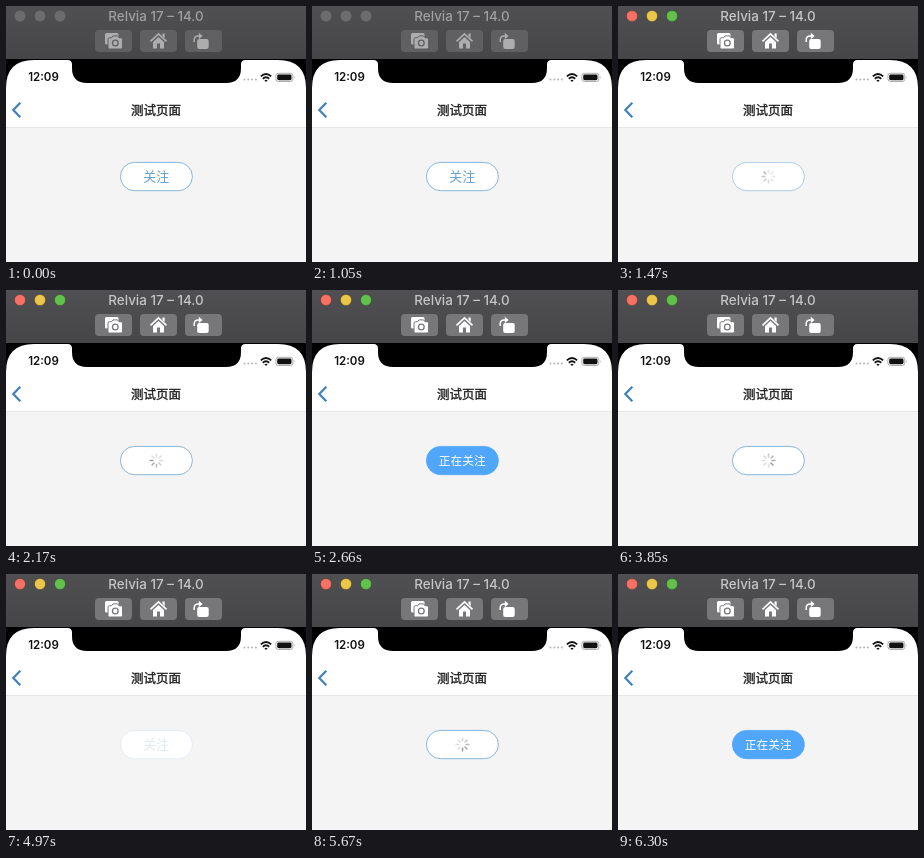
Recreate the animation shown at these times as an HTML page. Size 300 px wide and 256 px high, loop 6.37 s.

```html
<!DOCTYPE html>
<html lang="zh-CN">
<head>
<meta charset="utf-8">
<title>Follow button</title>
<style>
  html, body { margin: 0; width: 100%; height: 100%; overflow: hidden; background: #f4f4f5; }
  svg { display: block; width: 300px; height: 256px; }
  text { text-anchor: middle; font-family: "Noto Sans CJK SC", "Noto Sans CJK", "Noto Sans", sans-serif; }
  .latin { font-family: Inter, "Liberation Sans", sans-serif; }
  .tool { fill: #605f61; }
  .rim { stroke: #605f61; }
  .icon { color: #adadad; }
  .name { fill: #a09fa1; }
  .light { fill: #6c6b6d; }
  .active .tool { fill: #777678; }
  .active .rim { stroke: #777678; }
  .active .icon { color: #fff; }
  .active .name { fill: #c6c5c7; }
  .active .light { fill: var(--on); stroke: #0003; }
</style>
</head>
<body>
<svg viewBox="0 0 300 256">
  <defs>
    <linearGradient id="bar" x2="0" y2="1">
      <stop stop-color="#504f51"/><stop offset="1" stop-color="#464547"/>
    </linearGradient>
  </defs>

  <!-- Simulator window bar -->
  <g id="window">
    <rect width="300" height="53" fill="url(#bar)"/>
    <circle class="light" cx="14" cy="10" r="5.5" style="--on:#f77064"/>
    <circle class="light" cx="34" cy="10" r="5.5" style="--on:#ecc648"/>
    <circle class="light" cx="54" cy="10" r="5.5" style="--on:#62c04c"/>
    <text class="latin name" x="150" y="15.2" font-size="13.4" font-weight="500">Relvia 17 – 14.0</text>
    <g class="tool">
      <rect x="89" y="24" width="37" height="22" rx="4"/>
      <rect x="134" y="24" width="37" height="22" rx="4"/>
      <rect x="179" y="24" width="37" height="22" rx="4"/>
    </g>
    <g class="icon" fill="currentColor">
      <rect x="99" y="27" width="13.5" height="11.5" rx="1.5"/>
      <path class="rim" d="M103.500 31.700h2.200l1.300-1.800h4.600l1.300 1.800h2.100q1.500 0 1.500 1.500v8.300q0 1.500-1.500 1.500h-11.500q-1.500 0-1.500-1.500v-8.300q0-1.500 1.500-1.500z"/>
      <circle class="tool" cx="109.300" cy="37" r="3.500"/>
      <circle cx="109.300" cy="37" r="2.200"/>
      <path d="M144.500 35.300l8-7.400 8 7.400" fill="none" stroke="currentColor" stroke-width="1.700"/>
      <path d="M156.500 27.500h2.200v4.500l-2.200-2z"/>
      <path d="M147 35.900l5.500-5 5.500 5v6.600h-4v-5h-3v5h-4z"/>
      <rect x="191.200" y="33" width="11.500" height="10" rx="2"/>
      <path d="M188.200 36v-2q0-4 4-4h1.300" fill="none" stroke="currentColor" stroke-width="1.500"/>
      <path d="M192.800 26.800l3.800 3.200-3.800 3.200z"/>
    </g>
  </g>

  <!-- Phone screen -->
  <rect y="53" width="300" height="40" fill="#000"/>
  <path d="M0 121V82Q0 54 28 54H61.500Q66 54 66 58.500V62Q66 77 81 77H220Q235 77 235 62V58.500Q235 54 239.500 54H272Q300 54 300 82V121Z" fill="#fff"/>
  <rect y="121" width="300" height="135" fill="#f4f4f5"/>
  <rect y="121" width="300" height=".8" fill="#e4e4e5"/>

  <text class="latin" x="37.500" y="75.200" font-size="11.500" font-weight="600" fill="#111">12:09</text>
  <g fill="#b5b5b5">
    <circle cx="238.500" cy="73.500" r="1"/><circle cx="242.300" cy="73.500" r="1"/>
    <circle cx="246.100" cy="73.500" r="1"/><circle cx="249.900" cy="73.500" r="1"/>
  </g>
  <g fill="none" stroke="#111" stroke-width="1.800">
    <path d="M254.800 70.300q5.200-4.600 10.400 0M256.800 72.700q3.200-2.800 6.400 0"/>
    <path d="M258.400 74.300q1.600-1.200 3.200 0l-1.600 1.700z" fill="#111" stroke="none"/>
  </g>
  <rect x="269.900" y="67.300" width="16.900" height="8.200" rx="2.400" fill="none" stroke="#999" stroke-width=".8"/>
  <rect x="271.200" y="68.600" width="14.300" height="5.600" rx="1.400" fill="#111"/>
  <path d="M288 70q1.200 1.400 0 2.900z" fill="#999"/>

  <path d="M14.300 96.800l-7 7.200 7 7.200" fill="none" stroke="#3e82bd" stroke-width="2.200"/>
  <text x="150" y="108.700" font-size="12.500" fill="#222" stroke="#222" stroke-width=".35">测试页面</text>

  <!-- Follow button -->
  <rect x="114.400" y="156.400" width="72" height="28.300" rx="14.150" fill="#fff"/>
  <g id="button">
    <rect id="pill" x="114.400" y="156.400" width="72" height="28.300" rx="14.150" stroke-width=".8"/>
    <text id="label" x="150.200"></text>
    <g id="spinner" transform="translate(150.500 170.600)"></g>
  </g>
</svg>
<script>
const LOOP = 6370, TICK = 70, ACTIVATE = 1190;
const LOADING = 1050, SPIN_STEP = 105, BLADES = 8;
const taps = [
  { press: 1260, load: 1330 },
  { press: 3080, load: 3290 },
  { press: 4970, load: 5040 }
];
const DIM = 0.2;

const $ = id => document.getElementById(id);
const set = (el, attrs) => {
  for (const key in attrs) el.setAttribute(key, attrs[key]);
};

const blades = Array.from({ length: BLADES }, (_, i) => {
  const blade = document.createElementNS("http://www.w3.org/2000/svg", "path");
  set(blade, {
    d: "M0-3.6V-6.3", stroke: "#8a8a8e", "stroke-width": 1.5,
    "stroke-linecap": "round", transform: `rotate(${i * 360 / BLADES})`
  });
  $("spinner").append(blade);
  return blade;
});

const smooth = x => {
  const p = Math.min(1, Math.max(0, x));
  return p * p * (3 - 2 * p);
};

function buttonState(t) {
  let followed = false, opacity = 1, loadTime = -1;
  for (const { press, load } of taps) {
    if (t < press) break;
    const age = t - load;
    opacity = age < 0 ? DIM : DIM + (1 - DIM) * smooth((age - 50) / 160);
    loadTime = age >= 0 && age < LOADING ? age : -1;
    if (age >= LOADING) followed = !followed;
  }
  return { followed, opacity, loadTime };
}

function drawSpinner(age) {
  const head = Math.floor(age / SPIN_STEP) - 2 + BLADES;
  blades.forEach((blade, i) => {
    const behind = (head - i + BLADES) % BLADES;
    set(blade, { opacity: Math.max(0.28, 0.85 - behind * 0.13) });
  });
}

function render(time) {
  const t = Math.floor(time % LOOP / TICK) * TICK;
  const { followed, opacity, loadTime } = buttonState(t);
  const loading = loadTime >= 0;
  const filled = followed && !loading;

  $("window").classList.toggle("active", t >= ACTIVATE);
  set($("button"), { opacity });
  set($("pill"), {
    fill: filled ? "#4fa6fa" : "#fff",
    stroke: filled ? "#4fa6fa" : "#6aa3d2"
  });
  set($("label"), {
    y: filled ? 174.8 : 175.1,
    "font-size": filled ? 11.7 : 13,
    fill: filled ? "#fff" : "#669fcd",
    visibility: loading ? "hidden" : "visible"
  });
  $("label").textContent = followed ? "正在关注" : "关注";
  set($("spinner"), { visibility: loading ? "visible" : "hidden" });
  if (loading) drawSpinner(loadTime);
}

const began = performance.now();
function frame() {
  render(performance.now() - began);
  requestAnimationFrame(frame);
}
frame();
</script>
</body>
</html>
```
